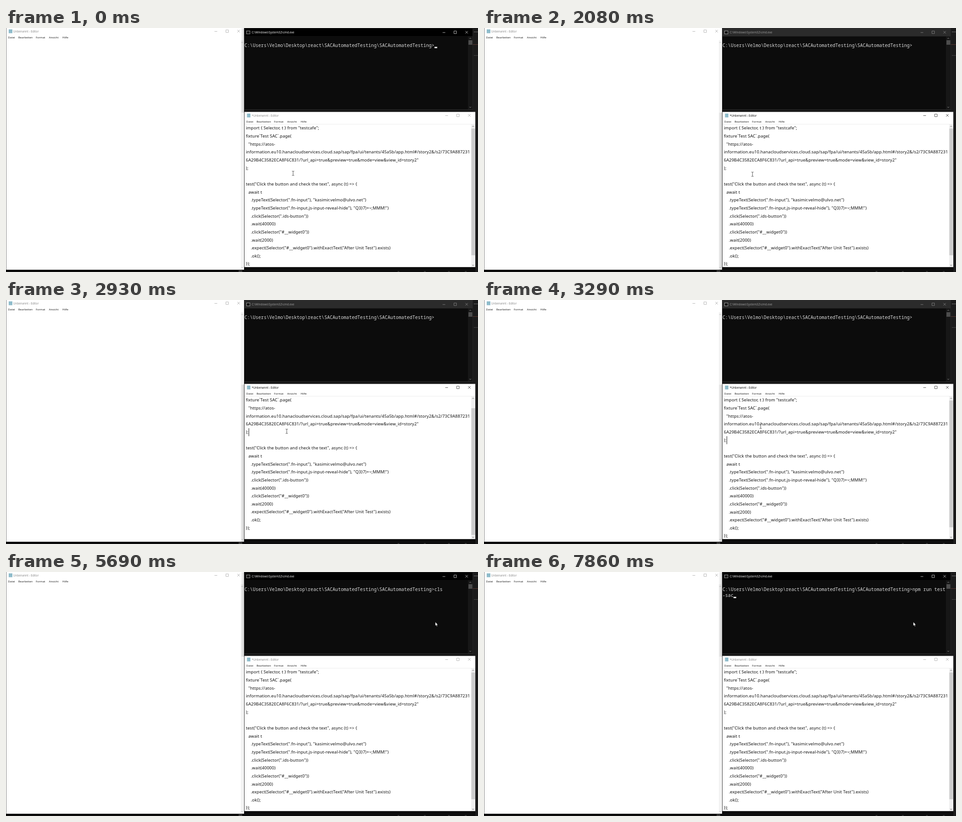
Recreate the animation shown at these times as an HTML page. Size 1039 by 539 pixels, loop 8 s.

```html
<!DOCTYPE html>
<html lang="de">
<head>
<meta charset="utf-8">
<title>Editor und Konsole</title>
<style>
html, body { margin: 0; width: 100%; height: 100%; overflow: hidden; background: #111; }
svg { display: block; width: 100%; height: 100%; }
text { white-space: pre; }
.ui { font: 6.15px "Noto Sans", "Open Sans", sans-serif; }
.code { font: 9.3px "Noto Sans", "Open Sans", sans-serif; letter-spacing: .12px; }
.term { font: 10.1px "Noto Sans Mono", "DejaVu Sans Mono", monospace; fill: #dadada; }
#beam { mix-blend-mode: difference; }
</style>
</head>
<body>
<svg id="stage" viewBox="0 0 1039 539" preserveAspectRatio="none">
  <defs>
    <clipPath id="page"><rect x="525" y="213" width="499" height="314.5"/></clipPath>
    <linearGradient id="shade">
      <stop offset="0" stop-color="#000" stop-opacity="0"/>
      <stop offset="1" stop-color="#000" stop-opacity=".16"/>
    </linearGradient>
  </defs>
</svg>
<script>
const LOOP = 8000, ROW = 17.65, TOP = 212.6;
const stage = document.getElementById("stage");

function add(tag, attrs, parent = stage) {
  const el = document.createElementNS("http://www.w3.org/2000/svg", tag);
  for (const k in attrs) el.setAttribute(k, attrs[k]);
  parent.appendChild(el);
  return el;
}
const box = (x, y, width, height, fill, parent) => add("rect", { x, y, width, height, fill }, parent);
const line = (d, stroke, width = 0.8, parent) =>
  add("path", { d, stroke, fill: "none", "stroke-width": width }, parent);
function label(x, y, str, cls, fill, parent) {
  const el = add("text", { x, y, class: cls }, parent);
  if (fill) el.setAttribute("fill", fill);
  el.textContent = str;
  return el;
}
const show = (el, on) => el.setAttribute("visibility", on ? "visible" : "hidden");

// minimise, maximise and close signs, 25 px apart
const controls = (x, y) => line(
  `M${x - 3} ${y + .5}h6M${x + 22} ${y - 2.8}h5.6v5.6h-5.6zM${x + 47.2} ${y - 2.8}l5.6 5.6m0-5.6l-5.6 5.6`, "#999", .7);
const chevron = (x, y, dir, color) => line(`M${x - 2} ${y + dir}l2 ${-2 * dir}l2 ${2 * dir}`, color, .9);

function menu(x, y) {
  ["Datei", "Bearbeiten", "Format", "Ansicht", "Hilfe"].forEach((s, i) =>
    label(x + [0, 22.5, 61, 90, 119.5][i], y, s, "ui", "#222"));
}

// backdrop
box(0, 0, 1039, 539, "#0d0d0d");
box(1027, 0, 12, 185, "#1b1b1b");
box(1033, 185, 6, 354, "#1b1b1b");
box(525, 181, 502, 4, "#161616");
box(512, 535, 8, 4, "#3a3a3a");
box(1027, 36, 12, .8, "#6b3f38");
for (const y of [8, 60]) for (let i = 0; i < 3; i++)
  box(1030.5 + i * 3, y, 1.2, 1.2, y < 10 ? "#ccc" : "#777");
for (const x of [862, 920, 973, 1010]) box(x, 537.4, 4, 1, "#555");

// empty editor on the left
box(0, 0, 524, 534, "#fff");
box(0, 0, .8, 534, "#666");
box(517, 27, 5.5, 507, "#f3f3f3");
chevron(519.8, 32, 1, "#bbb");
chevron(519.8, 529, -1, "#bbb");
box(6, 3, 8, 8.5, "#8fbccb");
label(16, 9.6, "Unbenannt - Editor", "ui", "#8a8a8a").style.fontSize = "6.25px";
controls(462, 7);
menu(4.5, 23.4);
const termShade = box(516, 1, 8.5, 186, "url(#shade)");
const editShade = box(516, 187, 8.5, 347, "url(#shade)");

// console
box(524.5, 0, 503, 181, "#2e2e2e");
const termBar = box(525, 1, 502, 17.5, "#000");
box(525, 18.5, 492.5, 161.5, "#0c0c0c");
box(1017.5, 18.5, 9.5, 161.5, "#171717");
box(1018, 27, 8.5, 10, "#4d4d4d");
chevron(1022, 23, 1, "#888");
chevron(1022, 175, -1, "#888");
add("rect", { x: 529.5, y: 6.5, width: 7.5, height: 6.5, fill: "#111", stroke: "#bbb", "stroke-width": .8 });
const termTitle = label(541, 12, "C:\\Windows\\System32\\cmd.exe", "ui");
termTitle.style.fontSize = "6.35px";
const termControls = controls(964, 9.5);
const prompt = "C:\\Users\\Velmo\\Desktop\\react\\SACAutomatedTesting\\SACAutomatedTesting>";
const termLine = label(525, 42, prompt, "term");
const termWrap = label(525, 55.3, "", "term");
const block = box(943.2, 41.6, 6, 2.9, "#f2f2f2");

// editor with the script
box(524.5, 185, 508.8, 343.5, "#555");
box(525, 185.5, 508, 342.5, "#fff");
box(530.5, 189, 7.5, 8.5, "#8fbccb");
const editTitle = label(541, 195.5, "*Unbenannt - Editor", "ui");
editTitle.style.fontSize = "6.25px";
const editControls = controls(970, 193);
menu(529, 209.4);
box(525, 212, 508, .7, "#e4e4e4");
box(1024, 213, 9, 315, "#f0f0f0");
const thumb = box(1024.3, 222, 8.4, 280, "#cdcdcd");
chevron(1028.2, 217.5, 1, "#555");
chevron(1028.2, 524, -1, "#555");

const script = [
  'import { Selector, t } from "testcafe";',
  "fixture`Test SAC`.page(",
  '  "https://atos-',
  "information.eu10.hanacloudservices.cloud.sap/sap/fpa/ui/tenants/45a5b/app.html#/story2&/s2/73C9A887231",
  '6A29B4C3582ECA8F6C831/?url_api=true&preview=true&mode=view&view_id=story2"',
  ");",
  "",
  'test("Click the button and check the text", async (t) => {',
  "  await t",
  '    .typeText(Selector(".fn-input"), "kasimir.velmo@ulvo.net")',
  '    .typeText(Selector(".fn-input.js-input-reveal-hide"), "Q3}7)+~;MMM!")',
  '    .click(Selector(".ids-button"))',
  "    .wait(40000)",
  '    .click(Selector("#__widget0"))',
  "    .wait(2000)",
  '    .expect(Selector("#__widget0").withExactText("After Unit Test").exists)',
  "    .ok();",
  "});"
];
const rowEnds = [690, 629, 596, 1018, 911, 535, 528, 774, 564, 790, 840, 667, 595, 670, 590, 853, 562, 539];
const page = add("g", { "clip-path": "url(#page)" });
const sheet = add("g", {}, page);
const marks = add("g", { fill: "#39f" }, sheet);
const words = add("g", {}, sheet);
script.forEach((row, i) => {
  const y = TOP + ROW * i, body = row.trimStart();
  add("rect", { x: 528, y, width: rowEnds[i] - 528, height: ROW + .1 }, marks);
  label(528 + 2.75 * (row.length - body.length), y + 11.8, body, "code", "", words);
});
const caret = box(528, 0, .9, 17.6, "#000", sheet);

// pointers
const beam = line("M-2.4-4.8H-.8L0-4L.8-4.8H2.4M0-4V4M-2.4 4.8H-.8L0 4L.8 4.8H2.4", "#c4c4c4", .9);
beam.id = "beam";
const arrow = add("path", {
  d: "M0 0V8.4L1.9 6.7L3.2 9.7L4.6 9.1L3.3 6.2H5.9Z", fill: "#fff", stroke: "#000", "stroke-width": .5
});

// [time, x, y, arrow?]
const mouse = [
  [0, 632, 321], [150, 640, 270], [270, 671, 207, 1], [420, 742, 142, 1], [540, 806, 85, 1],
  [790, 705, 196, 1], [910, 632, 298], [1060, 599, 367], [1340, 596, 344], [1460, 592, 327],
  [1580, 591, 323], [2690, 606, 304], [2810, 618, 290], [3050, 614, 285], [3170, 609, 279],
  [3690, 608, 269], [3810, 609, 264], [4060, 682, 231], [4180, 792, 165, 1], [4300, 892, 108, 1],
  [4420, 941, 74, 1], [4670, 944, 97, 1], [4790, 945, 110.5, 1]
];
const blockOn = [[0, 1], [150, 0], [910, 1], [1580, 0], [5160, 1], [5690, 0], [6710, 1], [7210, 0], [7860, 1]];
const caretOn = [[0, 0], [1580, 1], [2080, 0], [2810, 1], [3810, 0], [4300, 1], [4670, 0]];
const typed = [[0, "", ""], [5690, "cls", ""], [6210, "npm run test", "-sac"]];
const at = (steps, t) => steps.findLast(s => s[0] <= t);
const within = (t, a, b) => t >= a && t < b;

function draw(t) {
  const editing = within(t, 1580, 4670);
  const selected = within(t, 2450, 2810);
  const scrolled = within(t, 2450, 3290);

  termBar.setAttribute("fill", editing ? "#2b2b2b" : "#000");
  termTitle.setAttribute("fill", editing ? "#999" : "#eee");
  termControls.setAttribute("stroke", editing ? "#999" : "#fff");
  editTitle.setAttribute("fill", editing ? "#111" : "#8a8a8a");
  editControls.setAttribute("stroke", editing ? "#111" : "#999");
  show(termShade, !editing);
  show(editShade, editing);

  const [, first, second] = at(typed, t);
  termLine.textContent = prompt + first;
  termWrap.textContent = second;
  block.setAttribute("x", second ? 549.2 : 943.2);
  block.setAttribute("y", second ? 54.8 : 41.6);
  show(block, at(blockOn, t)[1]);

  sheet.setAttribute("transform", `translate(0 ${scrolled ? -ROW : 0})`);
  thumb.setAttribute("y", scrolled ? 239 : 222);
  show(marks, selected);
  words.setAttribute("fill", selected ? "#fff" : "#111");
  const blank = t < 2450;
  caret.setAttribute("x", blank ? 528 : 534.2);
  caret.setAttribute("y", TOP + ROW * (blank ? 6 : 5));
  show(caret, at(caretOn, t)[1]);

  const [, x, y, isArrow] = at(mouse, t);
  for (const p of [beam, arrow]) p.setAttribute("transform", `translate(${x} ${y})`);
  show(arrow, isArrow);
  show(beam, !isArrow);
}

const start = performance.now();
function tick() {
  draw((performance.now() - start) % LOOP);
  requestAnimationFrame(tick);
}
draw(0);
requestAnimationFrame(tick);
</script>
</body>
</html>
```
